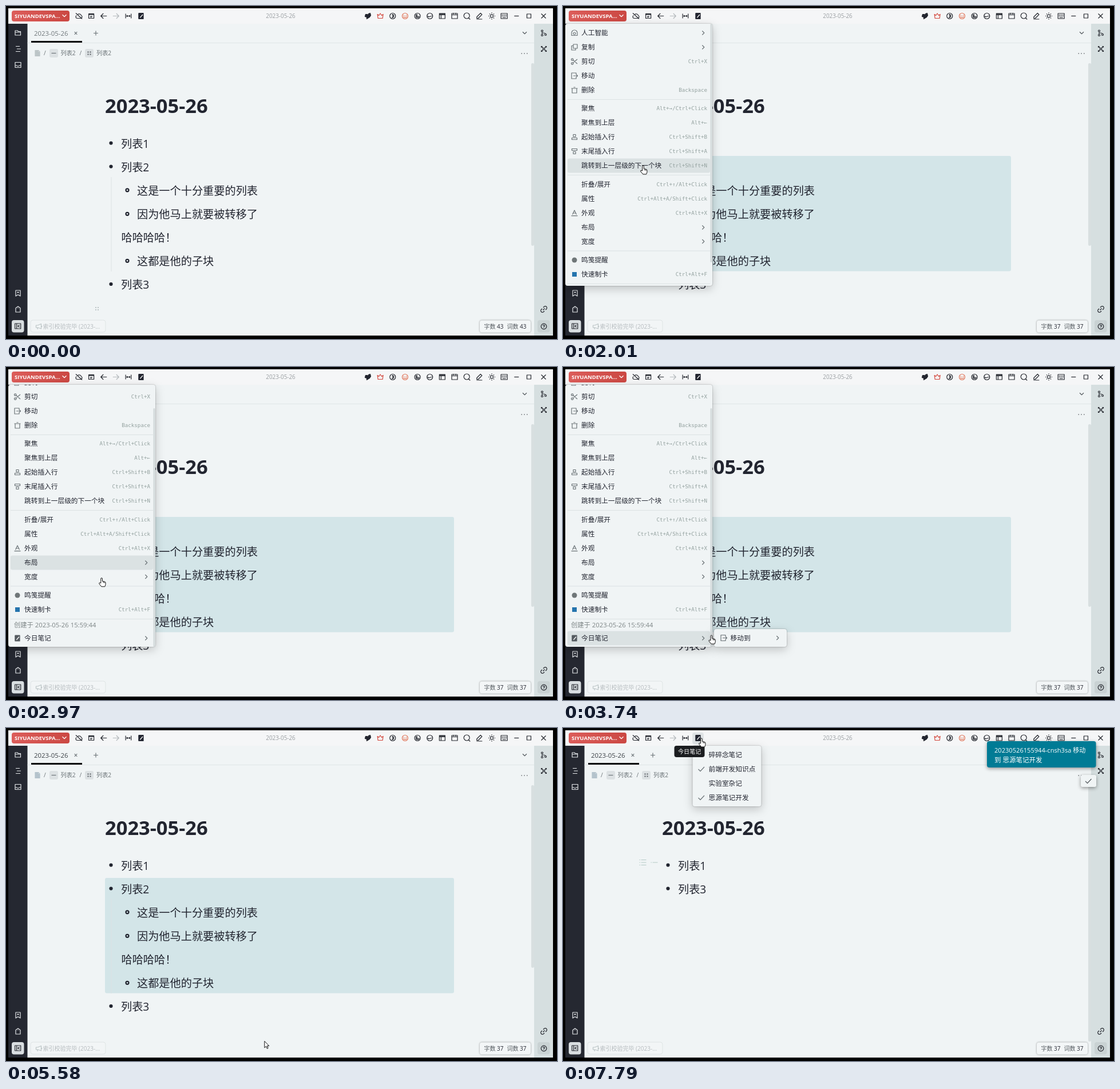
Write an HTML page that moves like this. It is 963 by 582 pixels and loops after 7.99 s.

```html
<!DOCTYPE html>
<html lang="zh-CN">
<head>
<meta charset="utf-8">
<title>今日笔记</title>
<style>
html, body { margin: 0; width: 100%; height: 100%; overflow: hidden; background: #000; }
svg { display: block; width: 100%; height: 100%; }
text { font-family: "Open Sans", "Noto Sans", "Noto Sans CJK SC", "Noto Sans CJK", sans-serif; fill: #222530; white-space: pre; }
text.key { font-family: "DejaVu Sans Mono", "Noto Sans Mono", monospace; fill: #93a19f; text-anchor: end; }
.icon { fill: none; stroke: #24272e; stroke-width: 1.2; stroke-linejoin: round; }
.panel { fill: #f0f4f5; filter: drop-shadow(0 0 1px #0005) drop-shadow(0 5px 8px #0003); }
</style>
</head>
<body>
<svg id="stage" viewBox="0 0 963 582"></svg>
<script>
const LOOP = 7990;
const INK = '#222530', GREY = '#6c7478', PALE = '#bcc5c7', LIGHT = '#e4e7ea', PAGE = '#f0f4f5', HOVER = '#dbe2e3';

const rect = (x, y, w, h, fill, r = 0, extra = '') =>
  `<rect x="${x}" y="${y}" width="${w}" height="${h}" rx="${r}" fill="${fill}" ${extra}/>`;
const panel = (x, y, w, h) => rect(x, y, w, h, PAGE, 4, 'class="panel"');
const hover = (id, x, w) => rect(x, 0, w, 25, HOVER, 3, `id="${id}"`);
// Text is placed by its vertical centre.
const text = (x, y, str, size = 11.7, fill = INK, extra = '') =>
  `<text x="${x}" y="${y}" dy=".37em" font-size="${size}" style="fill:${fill}" ${extra}>${str}</text>`;
const key = (y, str) => `<text class="key" x="252" y="${y}" dy=".34em" font-size="9.2">${str}</text>`;
const icon = (x, y, name, color = '#24272e', fill = 'none') =>
  `<path class="icon" transform="translate(${x} ${y})" d="${shapes[name]}" style="stroke:${color};fill:${fill}"/>`;
const on = (ranges, content) => `<g data-on="${ranges}">${content}</g>`;
const ring = r => `M${-r} 0a${r} ${r} 0 1 1 ${2 * r} 0a${r} ${r} 0 1 1 ${-2 * r} 0`;

const shapes = {
  cloud: 'M-3 4H3.5A2.7 2.7 0 0 0 4-1A4 4 0 0 0-2-3M-4-1A2.6 2.6 0 0 0-3 4M-5.500-5L5.500 5',
  calendar: 'M-4.500-4H4.500V4H-4.500zM-4.500-2.500H4.500M-4.500-3.300H4.500M-2 .5H2M-2 2H1',
  back: 'M5.500 0H-5M-.5-4.500L-5 0L-.5 4.500',
  forward: 'M-5.500 0H5M.5-4.500L5 0L.5 4.500',
  fit: 'M-4.800-4V4M4.800-4V4M-3 0H3M-1.500-1.500L-3 0L-1.500 1.500M1.500-1.500L3 0L1.500 1.500',
  book: 'M-4-5H4V5H-4zM-5-3H-3M-5 0H-3M-5 3H-3',
  pen: 'M-1 2L3-2.500M-1 2l-.5 1',
  plugin: 'M-2 5L-2 2L-5 1L-4-3L-1-3L0-1L1-4L4-5L5-1L3 2z',
  crown: 'M-5-3L-2.500-1L0-4.500L2.500-1L5-3L4 4H-4z',
  moon: ring(5) + 'M-1-3A3 3 0 1 1-1 3A4 4 0 0 0-1-3',
  smile: ring(5) + 'M-3-1H-1M1-1H3M-3 1Q0 4 3 1',
  spiral: ring(5) + 'M3 0A2.800 2.800 0 1 1 0-2.800M1 0A1 1 0 1 1 0-1',
  half: ring(5) + 'M-4 0Q-2 2 0 1Q2 0 4 0',
  layout: 'M-5-4.500H5V4.500H-5zM-5-2H5M-2-2V4.500M-5-3.300H5',
  window: 'M-5-4.500H5V4.500H-5zM-5-2H5M-2-5.500V-3M2-5.500V-3',
  search: 'M-5.500-.5a5 5 0 1 1 10 0a5 5 0 1 1-10 0M3 3.500L5.500 6',
  pencil: 'M-4.500 1.500L2-5L4.500-2.500L-2 4H-4.500zM-5 5.500H5',
  sun: ring(2.600) + 'M0-6V-4.500M0 4.500V6M-6 0H-4.500M4.500 0H6M-4-4L-3-3M3 3L4 4M-4 4L-3 3M3-3L4-4',
  keyboard: 'M-5.500-4.500H5.500V4.500H-5.500zM-4-2H-2M-1-2H1M2-2H4M-4 0H-2M-1 0H1M2 0H4M-3 2.500H3',
  minus: 'M-4 0H4', square: 'M-3.500-3.500H3.500V3.500H-3.500z',
  close: 'M-4-4L4 4M4-4L-4 4', cross: 'M-2.300-2.300L2.300 2.300M2.300-2.300L-2.300 2.300', plus: 'M-4 0H4M0-4V4',
  folder: 'M-5 4V-4H-1L.5-2.500H4.500V4zM-5-1H4.500',
  lines: 'M-4-4.500H3M-2 0H5M-4 4.500H4',
  inbox: 'M-5-4.500H5V4.500H-5zM-5 1H-2Q0 4 2 1H5',
  bookmark: 'M-4-5H4V5L0 2.500L-4 5zM-1.500-1.500H1.500M0-3V0',
  tag: 'M-4-2L0-5L4-2V5H-4zM0-2.500V-1.500',
  dock: 'M-5-4.500H5V4.500H-5zM-2-4.500V4.500M3-2L0 0L3 2',
  branch: 'M-3-2V2M-2 0Q3 0 3 2M-4.500-3.500a1.500 1.500 0 1 1 3 0a1.500 1.500 0 1 1-3 0M-4.500 4a1.500 1.500 0 1 1 3 0a1.500 1.500 0 1 1-3 0M1.500 3a1.500 1.500 0 1 1 3 0a1.500 1.500 0 1 1-3 0',
  graph: ring(1.500) + 'M-1-1L-3-3M1-1L3-3M-1 1L-3 3M1 1L3 3M-4.500-4.500H-3V-3H-4.500zM3-4.500H4.500V-3H3zM-4.500 3H-3V4.500H-4.500zM3 3H4.500V4.500H3z',
  link: 'M-1.500 1.500L1.500-1.500M-1-3L1-5Q3-6 4.500-4.500Q6-3 5-1L3 1M1 3L-1 5Q-3 6-4.500 4.500Q-6 3-5 1L-3-1',
  help: ring(4.800) + 'M-1.500-1Q-1.500-2.500 0-2.500Q1.500-2.500 1.500-1L0 .5V1.200M0 2.300V3',
  down: 'M-3.500-1.700L0 1.700L3.500-1.700', right: 'M-1.700-3.500L1.800 0L-1.700 3.500',
  more: 'M-5.500 0H-4M-.7 0H.8M4 0H5.500',
  doc: 'M-4-5H1.500L4-2.500V5H-4zM1-5V-2H4M-2 0H2M-2 2.500H2',
  dots: 'M-3-3H-1V-1H-3zM1-3H3V-1H1zM-3 1H-1V3H-3zM1 1H3V3H1z',
  horn: 'M-5-2H-2L4-4.500V4L-2 2H-5zM-3 2L-2 5M5-1V1',
  list: 'M-6-4.500H-4.500M-3-4.500H6M-6 0H-4.500M-3 0H6M-6 4.500H-4.500M-3 4.500H6',
  dash: 'M-6 0H-4.500M-3 0H6', fold: 'M-4-3H4L0 4z',
  robot: 'M-5 4.500V0A5 5 0 0 1 5 0V4.500zM-2 1a2 2 0 1 1 4 0a2 2 0 1 1-4 0',
  copy: 'M-2-5H5V2H-2zM-2-2.500H-5V5H2V2',
  cut: 'M-3-3L5 4M-3 3L5-4M-5.500-3.500a1.700 1.700 0 1 1 3.400 0a1.700 1.700 0 1 1-3.400 0M-5.500 3.500a1.700 1.700 0 1 1 3.400 0a1.700 1.700 0 1 1-3.400 0',
  move: 'M3-2V-5H-5V5H3V2M-2 0H5.500M3.500-2L5.500 0L3.500 2',
  trash: 'M-5.500-3H5.500M-4-3V5H4V-3M-1.500-5H1.500',
  before: 'M-2-4.500H2V-.5H-2zM-4.500 1.500H4.500V4.500H-4.500z',
  after: 'M-4.500-4.500H4.500V-1.500H-4.500zM-2 .5H2V4.500H-2z',
  letter: 'M-3.500 2.500L0-5L3.500 2.500M-2 0H2M-5.500 4.700H5.500',
  disc: ring(4.500), box: 'M-4-4H4V4H-4z',
  heart: 'M0 5L-5.500-1Q-6-5-2.500-5Q0-4.500 0-3Q0-4.500 2.500-5Q6-5 5.500-1z',
  heartTip: 'M0 5L-4 1H4z',
  printer: 'M-5-1H5V5H-5zM-3-1V-5H4V-1M-3 2H0M2 1H4M2 3H4',
  check: 'M-5 0L-1.500 3.500L5.500-4',
};

const notebook = (x, y, color = INK) => icon(x, y, 'book', color, color) + icon(x, y, 'pen', '#fff');
const bullet = y => `<circle cx="183.500" cy="${y}" r="3.100" fill="${INK}"/>`;
const subBullet = y => `<circle cx="212" cy="${y}" r="2.500" fill="none" stroke="${INK}" stroke-width="2.200"/>`;
const tooltip = (x, y, w, str) => rect(x, y, w, 20, '#1b1d20', 4) + text(x + 6.500, y + 10, str, 10.1, '#fff');

const topLeft = ['cloud', 'calendar', 'back', 'forward', 'fit'];
const topRight = ['plugin', 'crown', 'moon', 'smile', 'spiral', 'half', 'layout', 'window', 'search', 'pencil', 'sun', 'keyboard', 'minus', 'square'];
const topColor = { forward: '#b4b9bc', crown: '#d2463c', smile: '#e0765a' };

function chrome() {
  return rect(4, 4, 952, 572, PAGE) + rect(4, 4, 952, 27, '#f5f6f7') +
    rect(4, 31, 33.500, 545, '#252831') + rect(923, 31, 33, 545, '#d6dfe0') +
    rect(10, 8, 101, 19, 'url(#red)', 4) +
    text(15, 17.300, 'SIYUANDEVSPA...', 9.5, '#fff', 'font-weight="700"') + icon(102, 17, 'down', '#fff') +
    on('7170-7990', rect(226, 8, 20, 20, '#dfe3e5', 4)) +
    topLeft.map((n, i) => icon(127.500 + i * 21.600, 17.500, n, topColor[n])).join('') + notebook(236, 17.500) +
    text(480, 17.500, '2023-05-26', 9.9, '#9a9fa2', 'text-anchor="middle"') +
    topRight.map((n, i) => icon(632.500 + i * 21.650, 17.500, n, topColor[n], n === 'plugin' ? INK : 'none')).join('') +
    icon(939.500, 17.500, 'close') +
    [['folder', 47], ['lines', 75], ['inbox', 103], ['bookmark', 502], ['tag', 530]].map(([n, y]) => icon(21, y, n, LIGHT)).join('') +
    rect(10, 549, 21.500, 21.500, '#d9dee1', 4) + icon(20.700, 559.500, 'dock') +
    rect(929, 549, 21.500, 21.500, '#c9d2d3', 4) +
    [['branch', 47], ['graph', 75], ['link', 530], ['help', 560]].map(([n, y]) => icon(940, y, n)).join('') +
    rect(37.500, 64, 885.500, 1, '#dfe5e6') + rect(44, 61, 89, 3, '#08090b') +
    on('0-5180', text(49, 47.500, '2023-05-26', 11.4, '#70777b')) + on('5180-7990', text(49, 47.500, '2023-05-26', 11.4, '#3c4247')) +
    icon(122, 47.500, 'cross', GREY) + icon(157, 47.500, 'plus', GREY) + icon(906.500, 47, 'down', '#555b60') +
    on('0-5180', icon(55, 82.500, 'doc', PALE, PALE)) + on('5180-7990', icon(55, 82.500, 'doc', '#b4c3cc', '#b4c3cc')) +
    text(66, 82.500, '/', 10.2, GREY) + text(128.500, 82.500, '/', 10.2, GREY) +
    rect(76, 75, 15, 15, '#dce1e3', 3) + icon(83.500, 82.500, 'minus', GREY) + text(95.500, 82.500, '列表2', 10.2, GREY) +
    rect(138, 75, 15, 15, '#dce1e3', 3) + icon(145.500, 82.500, 'dots', 'none', '#555b60') + text(158, 82.500, '列表2', 10.2, GREY) +
    icon(906, 83, 'more') +
    on('0-5650', rect(918, 100, 5, 319, '#d8dfe0', 2)) + on('5650-7990', rect(918, 100, 5, 448, '#d8dfe0', 2)) +
    rect(43, 549, 131, 21, '#f2f5f6', 4, 'stroke="#dfe4e5"') + icon(57.500, 560, 'horn', PALE) +
    text(64.500, 560, '索引校验完毕 (2023-...', 10, '#b6bcbf') +
    `<g style="filter:drop-shadow(0 0 1.500px #0006)">${rect(828, 549.500, 89, 21, '#f3f6f7', 4)}</g>` +
    text(835.500, 560, '字数', 10, '#555b60') + text(875.500, 560, '词数', 10, '#555b60') +
    [['0-1950', 43], ['1950-7990', 37]].map(([r, n]) => on(r, text(858, 560, n, 10) + text(898, 560, n, 10))).join('');
}

function page() {
  const sub = [['这是一个十分重要的列表', 322.500], ['因为他马上就要被转移了', 364], ['这都是他的子块', 446]];
  return text(173, 174.500, '2023-05-26', 34.5, INK, 'font-weight="700"') +
    on('1480-5650', rect(173, 262, 610, 201.500, '#d3e5e8', 3)) +
    bullet(239.500) + text(201, 240.500, '列表1', 19.2) +
    on('0-5650', bullet(280.500) + text(201, 281.500, '列表2', 19.2) + rect(183.500, 299, 1, 165, '#dbe1e3') +
      sub.map(([s, y]) => subBullet(y - .7) + text(229, y, s, 19.2)).join('') +
      text(201.500, 405, '哈哈哈哈！', 19.2) + bullet(486) + text(201, 487, '列表3', 19.2)) +
    on('5650-7990', bullet(280.500) + text(201, 281.500, '列表3', 19.2)) +
    on('0-700', icon(159, 529, 'dots', 'none', PALE)) +
    on('1150-1480', rect(149, 266, 20, 20, '#e0e5e6', 3)) + on('1480-5180', rect(129, 266, 20, 20, '#e0e5e6', 3)) +
    on('1150-5180', icon(139, 276, 'dash', PALE) + icon(159, 276, 'fold', 'none', '#7d8386')) +
    on('1340-1480', tooltip(112.500, 296.500, 56, '折叠/展开')) +
    on('5800-6700', icon(152, 359, 'list', PALE) + icon(172, 359, 'dash', PALE)) +
    on('6250-6600', icon(158, 174, 'doc', '#dde3e4')) +
    on('6700-7990', icon(139.500, 235, 'list', '#b3c9c6') + icon(159.500, 235, 'dash', '#b3c9c6'));
}

const rows = [
  [47, '人工智能', '>', 'robot'], [72, '复制', '>', 'copy'], [97, '剪切', 'Ctrl+X', 'cut'], [122, '移动', '', 'move'],
  [147, '删除', 'Backspace', 'trash'], [179, '聚焦', 'Alt+→/Ctrl+Click'], [204, '聚焦到上层', 'Alt+←'],
  [229, '起始插入行', 'Ctrl+Shift+B', 'before'], [254, '末尾插入行', 'Ctrl+Shift+A', 'after'],
  [279, '跳转到上一层级的下一个块', 'Ctrl+Shift+N'], [312, '折叠/展开', 'Ctrl+↑/Alt+Click'],
  [337, '属性', 'Ctrl+Alt+A/Shift+Click'], [362, '外观', 'Ctrl+Alt+X', 'letter'], [387, '布局', '>'], [411.500, '宽度', '>'],
  [444, '鸣笺提醒', '', 'disc'], [469, '快速制卡', 'Ctrl+Alt+F', 'box'], [519, '今日笔记', '>', 'book'],
];
const notes = ['碎碎念笔记', '前端开发知识点', '实验室杂记', '思源笔记开发'];

function menuRow([y, label, hint, name]) {
  const mark = { disc: icon(20, y, 'disc', 'none', '#6f7678'), box: icon(20, y, 'box', 'none', '#2574ad'), book: notebook(20, y, '#555b60') };
  return text(32, y, label) + (hint === '>' ? icon(245, y, 'right', GREY) : key(y, hint)) +
    (name ? mark[name] || icon(20, y, name, GREY) : '');
}

function menus() {
  const separators = [163, 295, 427.500, 485].map(y => rect(8, y, 249, 1, '#dce2e3')).join('');
  return on('1880-5180', panel(4, 31, 257, 458) +
      `<g clip-path="url(#menuClip)"><g id="scroll">${hover('mainHover', 8, 249)}${rows.map(menuRow).join('')}${separators}` +
      text(14, 496, '创建于 2023-05-26 15:59:44', 11.3, '#7d8586') + '</g></g>' +
      rect(257.500, 31, 3, 417, '#d3dadb', 1.5, 'id="thumb"')) +
    on('3300-5180', panel(264, 458, 127, 31) + on('3800-5180', rect(268, 462, 120, 25, HOVER, 3)) +
      icon(281, 473.500, 'move', GREY) + text(292.500, 474, '移动到') + icon(375, 473.500, 'right', GREY)) +
    on('3880-5180', panel(394, 458, 120, 106) + hover('noteHover', 397.500, 113.500) +
      icon(410, 474, 'heart', 'none', '#b8434a') + icon(410, 474, 'heartTip', 'none', '#5b6f96') + rect(405, 473, 10, 2, '#eee') +
      icon(410, 499, 'printer', '#7b8a93', '#dde4e8') + icon(410, 524, 'printer', '#7b8a93', '#dde4e8') +
      icon(410, 548, 'doc', '#a9b8bf', '#d3dde1') +
      notes.map((s, i) => text(422.500, 474 + i * 25, s)).join('')) +
    on('7510-7990', panel(226.500, 31, 120, 106) + notes.map((s, i) =>
      text(254.500, 47 + i * 25, s) + (i % 2 ? icon(241.500, 47 + i * 25, 'check', GREY) : '')).join('')) +
    on('7240-7990', tooltip(194.500, 31, 53, '今日笔记')) +
    on('5720-7990', `<g style="filter:drop-shadow(0 2px 3px #0006)">${rect(741, 23, 190.500, 46, '#007b95', 4)}${rect(905, 82, 27, 21, PAGE, 3)}</g>` +
      text(754, 38.500, '20230526155944-cnsh3sa 移动', 11.1, '#fff') + text(754, 55.500, '到 思源笔记开发', 11.5, '#fff') +
      icon(918, 93, 'check', '#555b60'));
}

const pointer = `<g id="cursor" fill="#fff" stroke="#111" stroke-width="1" stroke-linejoin="round">
  <path id="arrow" d="M0 0V11.500L2.700 9L4.500 13L6.300 12.200L4.500 8.300H8z"/>
  <path id="hand" d="M-1.300 9V1.200A1.300 1.300 0 0 1 1.300 1.200V5.500L5.500 6.400Q6.900 6.800 6.900 8.300V11.500L5.700 15H-.3L-4.300 10Q-4.700 8-3 8.200zM3 6.300V8.500M5 6.700V8.700"/></g>`;

const stage = document.getElementById('stage');
stage.innerHTML = `<defs>
  <linearGradient id="red"><stop stop-color="#dc5d5a"/><stop offset="1" stop-color="#cb4843"/></linearGradient>
  <clipPath id="menuClip"><rect x="4" y="31" width="257" height="458"/></clipPath></defs>` +
  chrome() + page() + menus() + pointer;

const $ = id => document.getElementById(id);
const timed = [...stage.querySelectorAll('[data-on]')].map(el => [el, ...el.dataset.on.split('-').map(Number)]);

// time, x, y of the pointer tip
const path = [
  [510, 800, 540], [800, 470, 400], [1100, 200, 292], [1290, 148, 277], [1430, 148, 277], [1550, 140, 278], [1880, 140, 279],
  [2700, 140, 279], [3050, 175, 395], [3330, 228, 470], [3400, 228, 470], [3740, 259, 469], [3950, 335, 475],
  [4150, 335, 475], [4400, 420, 478], [4770, 448, 537], [4910, 452, 548], [5580, 452, 548], [5900, 400, 330],
  [6350, 299, 73], [6430, 299, 73], [6750, 280, 230], [7170, 242, 18], [7990, 242, 18],
];
const clamp = k => Math.min(1, Math.max(0, k));
const smooth = k => k * k * (3 - 2 * k);
function pointerAt(t) {
  const i = Math.max(1, path.findIndex(p => p[0] > t));
  const [a, b] = [path[i - 1], path[i]];
  const k = clamp((t - a[0]) / (b[0] - a[0]));
  return [a[1] + (b[1] - a[1]) * k, a[2] + (b[2] - a[2]) * k];
}
const nearest = (list, y) => list.reduce((a, b) => Math.abs(b - y) < Math.abs(a - y) ? b : a);

function render(t) {
  for (const [el, from, to] of timed) el.style.display = t >= from && t < to ? '' : 'none';

  const scroll = 45 * smooth(clamp((t - 2600) / 250));
  $('scroll').setAttribute('transform', `translate(0 ${-scroll})`);
  $('thumb').setAttribute('y', 31 + scroll * 41 / 45);

  const [x, y] = pointerAt(t);
  $('cursor').setAttribute('transform', `translate(${x} ${y})`);
  $('cursor').style.display = t < 510 ? 'none' : '';
  const isHand = t >= 1200 && t < 5180 || t >= 7100;
  $('hand').style.display = isHand ? '' : 'none';
  $('arrow').style.display = isHand ? 'none' : '';

  // Hover feedback trails the pointer slightly.
  const [, hoverY] = pointerAt(t - 70);
  const mainY = t > 3330 ? 519 : nearest(rows.map(r => r[0]), hoverY + scroll);
  $('mainHover').setAttribute('y', mainY - 12.500);
  $('noteHover').setAttribute('y', nearest([474, 499, 524, 549], hoverY) - 12.500);
  $('noteHover').style.display = t > 4350 ? '' : 'none';
}

const start = performance.now();
(function frame() {
  render((performance.now() - start) % LOOP);
  requestAnimationFrame(frame);
})();
</script>
</body>
</html>
```
